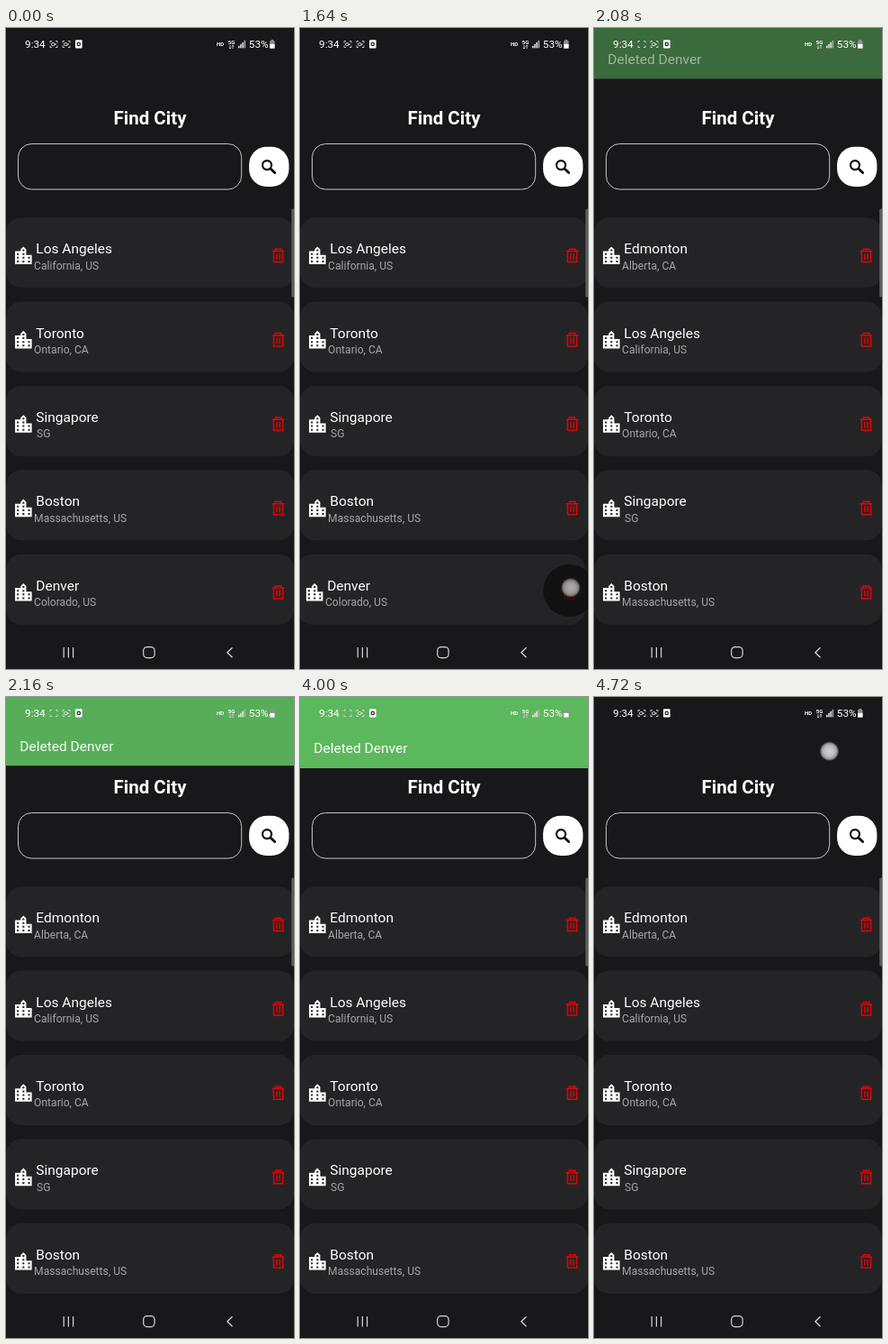
Animation, 320 px wide and 711 px high, one loop 4760 ms. Source, as an HTML page with a canvas:

```html
<!DOCTYPE html>
<html lang="en">
<head>
<meta charset="utf-8">
<title>Find City</title>
<style>
  html, body { margin: 0; width: 100%; height: 100%; overflow: hidden; background: #18181a; }
  canvas { display: block; width: 320px; height: 711px; }
</style>
</head>
<body>
<canvas id="stage" width="320" height="711"></canvas>
<script>
const ctx = document.getElementById('stage').getContext('2d');
const LOOP = 4760;
const BG = '#18181a', CARD = '#242426';
const ROW_TOP = 210.2, ROW_STEP = 93.37, ROW_HEIGHT = 78;
const TOUCH_AT = 1520, SLIDE_AT = 1620, LIST_AT = 1950;
const TOAST_IN = 1955, TOAST_OUT = 4084, TOAST_TIME = 250;

// The leading space in " SG" is what remains of an empty region.
const cities = [
  ['Edmonton', 'Alberta, CA'],
  ['Los Angeles', 'California, US'],
  ['Toronto', 'Ontario, CA'],
  ['Singapore', ' SG'],
  ['Boston', 'Massachusetts, US'],
  ['Denver', 'Colorado, US']
];

const cityIcon = new Path2D('M15 11V5l-3-3-3 3v2H3v14h18V11h-6z' +
  'm-8 8H5v-2h2v2zm0-4H5v-2h2v2zm0-4H5V9h2v2z' +
  'm6 8h-2v-2h2v2zm0-4h-2v-2h2v2zm0-4h-2V9h2v2zm0-4h-2V5h2v2z' +
  'm6 12h-2v-2h2v2zm0-4h-2v-2h2v2z');
const trashIcon = new Path2D('M295.8 247.6H309.2M299.3 247.5V245.2H305.7V247.5' +
  'M297.4 248V259.6H307.6V248M300.9 250.2V257M304.1 250.2V257');
const cornerMarks = new Path2D('M0.5 2.5V0.5H2.5M6.5 0.5H8.5V2.5M8.5 5.5V7.5H6.5M2.5 7.5H0.5V5.5');

const clamp = v => Math.max(0, Math.min(1, v));
const easeInOut = v => { v = clamp(v); return v < .5 ? 2 * v * v : 1 - 2 * (1 - v) ** 2; };

function text(str, x, y, size, color = '#fff', weight = 400, align = 'left') {
  ctx.font = `${weight} ${size}px Roboto, sans-serif`;
  ctx.textAlign = align;
  ctx.fillStyle = color;
  ctx.fillText(str, x, y);
}

function rect(x, y, w, h, color) {
  ctx.fillStyle = color;
  ctx.fillRect(x, y, w, h);
}

function roundRect(x, y, w, h, r) {
  ctx.beginPath();
  ctx.roundRect(x, y, w, h, r);
}

function circle(x, y, r) {
  ctx.beginPath();
  ctx.arc(x, y, r, 0, Math.PI * 2);
}

function stroke(color, width, path) {
  ctx.strokeStyle = color;
  ctx.lineWidth = width;
  path ? ctx.stroke(path) : ctx.stroke();
}

function drawHeader() {
  text('Find City', 160, 107, 20.5, '#fff', 700, 'center');
  roundRect(13.5, 128.5, 248.2, 50.5, 15);
  stroke('#d8d8d8', .9);
  roundRect(270.1, 131.7, 44.3, 44.3, 19.5);
  ctx.fillStyle = '#fff';
  ctx.fill();
  circle(290, 152.1, 5);
  stroke('#000', 2.1);
  ctx.lineCap = 'round';
  stroke('#000', 2.8, new Path2D('M294.4 156.6L298.6 160.6'));
  ctx.lineCap = 'butt';
}

function drawRow([name, region], y, dx, t) {
  ctx.save();
  ctx.translate(dx, y - ROW_TOP);
  roundRect(0, ROW_TOP, 320, ROW_HEIGHT, 17);
  ctx.fillStyle = CARD;
  ctx.fill();
  ctx.save();
  ctx.translate(7, 240.4);
  ctx.scale(1.03, 1.03);
  ctx.fillStyle = '#fff';
  ctx.fill(cityIcon);
  ctx.restore();
  text(name, 33.3, 250.2, 15.5);
  text(region, 31.1, 267.7, 12.1, '#a6a6a7');
  stroke('#e00505', 1.5, trashIcon);
  if (name === 'Denver') drawRipple(t);
  ctx.restore();
}

function drawRipple(t) {
  const age = t - TOUCH_AT;
  if (age < 0) return;
  const fade = clamp((age + 30) / 75) * (1 - clamp((age - 140) / 180));
  circle(302.3, 250.5, 17 + 12 * clamp((age + 20) / 120));
  ctx.fillStyle = `rgba(10,10,11,${.7 * fade})`;
  ctx.fill();
}

function drawList(t) {
  const first = t < LIST_AT ? 1 : 0;
  const slide = -322 * easeInOut((t - SLIDE_AT) / 300);
  for (let i = 0; i < 5; i++) {
    const city = cities[first + i];
    drawRow(city, ROW_TOP + i * ROW_STEP, city[0] === 'Denver' ? slide : 0, t);
  }
  roundRect(317.2, 200.5, 4, 98, 1.5);
  ctx.fillStyle = '#5d5d5f';
  ctx.fill();
}

function drawToast(t) {
  const shown = easeInOut((t - TOAST_IN) / TOAST_TIME) - easeInOut((t - TOAST_OUT) / TOAST_TIME);
  if (shown <= 0) return;
  ctx.save();
  ctx.globalAlpha = shown;
  ctx.translate(0, -46 * (1 - shown));
  rect(0, -10, 320, 89, '#5cb85c');
  text('Deleted Denver', 15.3, 62.4, 15.5);
  ctx.restore();
}

function drawCapture(x, filled) {
  ctx.save();
  ctx.translate(x, 14);
  stroke('#d5d5d5', .9, cornerMarks);
  if (filled) {
    roundRect(2.2, 2.6, 3.2, 3, .6);
    stroke('#e5e5e5', .9);
    rect(5.8, 3.2, 1.2, 1.8, '#e5e5e5');
  }
  ctx.restore();
}

function drawStatus(t) {
  text('9:34', 21, 22, 11.8);
  const blinkOn = Math.floor((t - 9) / 497.5) & 1;
  drawCapture(48.5, blinkOn);
  drawCapture(62.5, true);
  roundRect(77, 13.3, 7.6, 9.2, 1);
  ctx.fillStyle = '#fff';
  ctx.fill();
  circle(80.8, 17.9, 1.7);
  stroke('#222', 1.2);

  text('HD', 234, 20.2, 6, '#fff', 700);
  text('5G', 246.8, 17.8, 6, '#fff', 700);
  stroke('#ccc', .9, new Path2D('M249 19V23M247.8 21.8L249 23L250.2 21.8M252 23V19M250.8 20.2L252 19L253.2 20.2'));
  for (let i = 0; i < 4; i++) {
    const h = 2.5 + i * 2;
    rect(258 + i * 2.2, 22.3 - h, 1.5, h, i < 3 ? '#e8e8e8' : '#b0b0b0');
  }
  text('53%', 269.8, 22, 11.8);
  rect(294.5, 13, 2.5, 1.2, '#999');
  roundRect(293, 14, 5.5, 8.6, 1);
  ctx.fillStyle = '#8c8c8c';
  ctx.fill();
  rect(293, 17.8, 5.5, 4.8, '#fff');
}

function drawNav() {
  for (const x of [64.2, 69.4, 74.6]) rect(x - .6, 687, 1.2, 11.5, '#d6d6d6');
  roundRect(152.7, 686.6, 12.4, 12, 4);
  stroke('#d6d6d6', 1.2);
  stroke('#d6d6d6', 1.3, new Path2D('M251.5 687.3L245.9 692.8L251.5 698.3'));
}

function drawTouch(x, y, alpha) {
  const glow = ctx.createRadialGradient(x, y, 0, x, y, 11.5);
  glow.addColorStop(0, '#d2d2d2');
  glow.addColorStop(.55, '#b9b9b9');
  glow.addColorStop(.78, '#8b8b8b');
  glow.addColorStop(.88, 'rgba(70,70,70,.8)');
  glow.addColorStop(1, 'rgba(30,30,30,0)');
  ctx.globalAlpha = alpha;
  circle(x, y, 11.5);
  ctx.fillStyle = glow;
  ctx.fill();
  ctx.globalAlpha = 1;
}

function draw(t) {
  rect(0, 0, 320, 711, BG);
  drawHeader();
  drawList(t);
  drawToast(t);
  drawStatus(t);
  drawNav();
  if (t >= TOUCH_AT && t < 1680) drawTouch(300.8, 620.8, t < SLIDE_AT ? 1 : .8);
  if (t >= 4720) drawTouch(261.5, 60.2, 1);
}

const start = performance.now();
function tick() {
  draw((performance.now() - start) % LOOP);
  requestAnimationFrame(tick);
}
tick();
</script>
</body>
</html>
```
